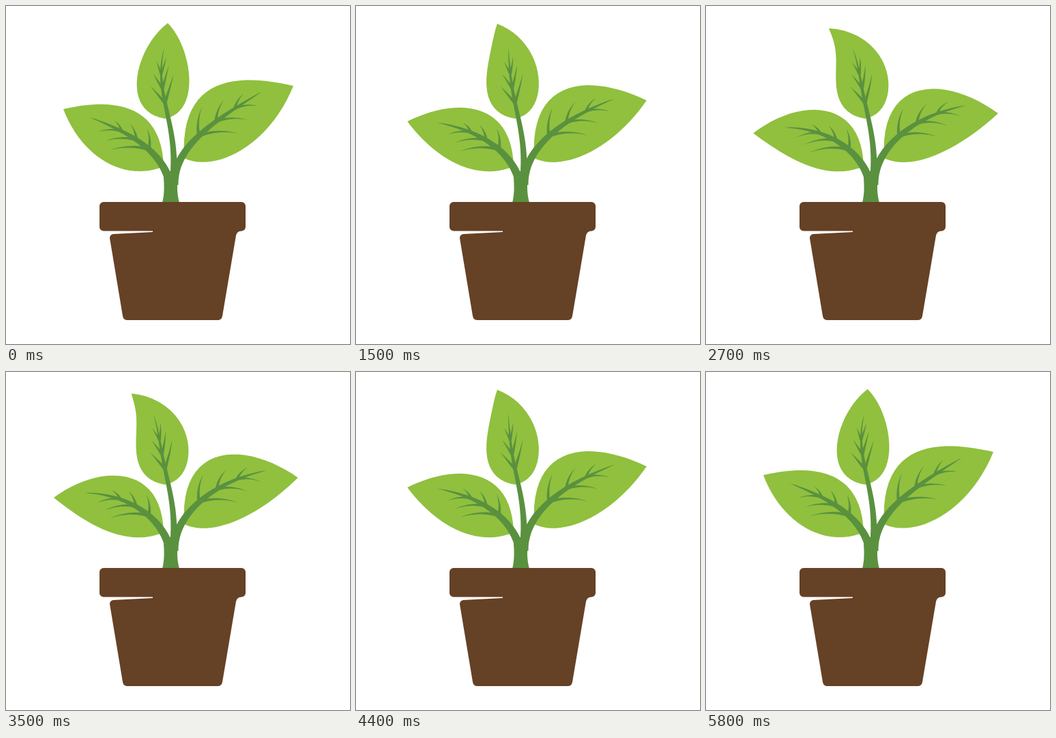
An HTML page with a canvas for the animation above (6 s loop, 504 px wide and 495 px high).

```html
<!DOCTYPE html>
<html lang="en">
<head>
<meta charset="utf-8">
<title>Potted plant</title>
<style>
  html, body { margin: 0; width: 100%; height: 100%; overflow: hidden; background: #fff; }
  canvas { display: block; }
</style>
</head>
<body>
<canvas id="stage" width="504" height="495"></canvas>
<script>
const STEP = 100, LOOP = 6000, LAST = 5800, SWAY = 5900;
const LEAF = '#90c03e', STEM = '#5a913f', POT = '#654126';
const ctx = document.getElementById('stage').getContext('2d');

// left/right: curve handles from tip to base. rib: centre line from trunk to rib end.
// drop: where the tip goes when fully bent. stiff: how much the bend gathers at the tip.
// reach: longest vein on each side.
const leaves = [
  { base: [233, 165], tip: [237, 25], drop: [179, 33], stiff: 3,
    left: [[190, 60], [166, 155]], right: [[272, 60], [287, 155]],
    rib: [[244, 262], [255, 170], [214, 130], [232, 61]], ribWidth: 10,
    first: 0.56, gap: 0.12, reach: [32, 44], spread: 0.5, curl: 0 },
  { base: [231, 235], tip: [84, 151], drop: [69, 187], stiff: 2,
    left: [[112, 224], [176, 258]], right: [[148, 136], [228, 137]],
    rib: [[241, 262], [229, 212], [183, 186], [123, 163]], ribWidth: 13,
    first: 0.42, gap: 0.15, reach: [57, 31], spread: 0.75, curl: 0.3 },
  { base: [261, 223], tip: [421, 117], drop: [428, 158], stiff: 1.6,
    left: [[340, 98], [254, 102]], right: [[385, 206], [306, 244]],
    rib: [[246, 262], [246, 200], [320, 160], [375, 125]], ribWidth: 13,
    first: 0.45, gap: 0.16, reach: [42, 57], spread: 0.7, curl: -0.3 }
];

const mix = (a, b, t) => [a[0] + (b[0] - a[0]) * t, a[1] + (b[1] - a[1]) * t];
const polar = ([x, y], angle, r) => [x + Math.cos(angle) * r, y + Math.sin(angle) * r];
const heading = (a, b) => Math.atan2(b[1] - a[1], b[0] - a[0]);
const distance = (a, b) => Math.hypot(b[0] - a[0], b[1] - a[1]);

function bezier(pts, t) {
  while (pts.length > 1) pts = pts.slice(1).map((p, i) => mix(pts[i], p, t));
  return pts[0];
}

function sample(fn, n = 24) {
  return Array.from({ length: n + 1 }, (_, i) => fn(i / n));
}

const direction = (pts, t) => heading(bezier(pts, t - 0.01), bezier(pts, t + 0.01));

// Outline of a curve that narrows to a point.
function taper(pts, width, power) {
  const side = sign => t =>
    polar(bezier(pts, t), direction(pts, t) + sign * Math.PI / 2, width / 2 * (1 - t) ** power);
  return [...sample(side(-1)), ...sample(side(1)).reverse()];
}

function veins({ rib, first, gap, reach, spread, curl }) {
  const out = [];
  for (let i = 0; i < 3; i++) {
    const t = first + gap * i;
    const start = bezier(rib, t), along = direction(rib, t);
    reach.forEach((max, j) => {
      const length = max * (1 - 0.2 * i);
      const angle = along + (j ? 1 : -1) * spread * (1 - 0.17 * i);
      const pts = [start, polar(start, angle + curl, length / 2), polar(start, angle, length)];
      out.push(taper(pts, 5 - 0.5 * i, 0.9));
    });
  }
  return out;
}

// Turn and stretch points about the leaf base, most at the tip.
function bender({ base, tip, drop, stiff }) {
  const size = distance(base, tip), axis = heading(base, tip);
  const turn = heading(base, drop) - axis, stretch = distance(base, drop) / size;
  return (p, k) => {
    const r = distance(base, p), angle = heading(base, p);
    const s = Math.max(0, r * Math.cos(angle - axis) / size);
    const q = k * s ** stiff;
    return polar(base, angle + turn * q, r * stretch ** q);
  };
}

const shapes = leaves.map(leaf => {
  const { base, tip, left, right, rib, ribWidth } = leaf;
  const side = handles => sample(t => bezier([tip, ...handles, base], t));
  return {
    bend: bender(leaf),
    blade: [...side(left), ...side(right).reverse()],
    lines: [taper(rib, ribWidth, 0.75), ...veins(leaf)]
  };
});

const trunk = new Path2D('M229 288C232 277 232 265 231 252L239 241L252 250C250 265 251 277 254 288Z');
const pot = new Path2D('M152 340Q152 335 157 334L215 331V325H346V329Q338 330 337 336L317 454Q316 460 310 460H178Q172 460 171 454Z');
const rim = new Path2D();
rim.roundRect(137, 287, 214, 42.5, 6);

function fill(pts, color) {
  ctx.fillStyle = color;
  ctx.beginPath();
  pts.forEach(p => ctx.lineTo(...p));
  ctx.fill();
}

function fillPath(path, color) {
  ctx.fillStyle = color;
  ctx.fill(path);
}

function draw() {
  const t = Math.min(Math.floor(performance.now() % LOOP / STEP) * STEP, LAST);
  const k = (1 - Math.cos(2 * Math.PI * t / SWAY)) / 2;
  ctx.clearRect(0, 0, 504, 495);
  for (const { bend, blade } of shapes) fill(blade.map(p => bend(p, k)), LEAF);
  for (const { bend, lines } of shapes) {
    for (const line of lines) fill(line.map(p => bend(p, k)), STEM);
  }
  fillPath(trunk, STEM);
  fillPath(pot, POT);
  fillPath(rim, POT);
  requestAnimationFrame(draw);
}
draw();
</script>
</body>
</html>
```
